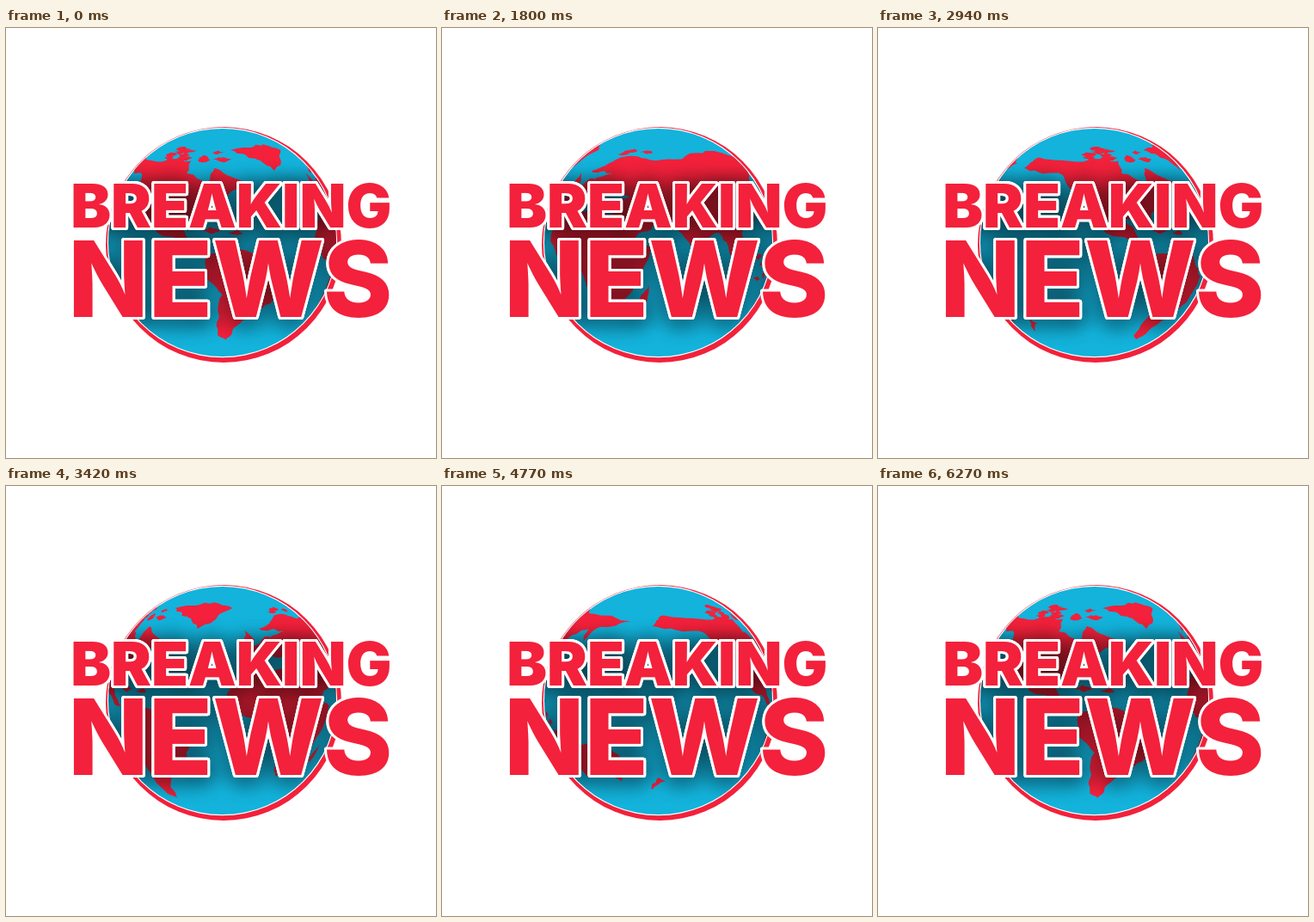
Recreate the animation shown at these times as an HTML page with a canvas. Size 500 by 500 pixels, loop 6300 ms.

```html
<!DOCTYPE html>
<html lang="en">
<head>
<meta charset="utf-8">
<title>Breaking News</title>
<style>
  html, body { margin: 0; width: 100%; height: 100%; overflow: hidden; background: #fff; }
  canvas { display: block; width: 500px; height: 500px; }
</style>
</head>
<body>
<canvas id="stage" width="500" height="500" role="img" aria-label="BREAKING NEWS"></canvas>
<script>
const LOOP = 6300, STEP = 30, TURNS = 2, START = -71, RAD = Math.PI / 180;
const RED = '#f3213b', SEA = '#13b3dc';
const GLOBE = { x: 251.5, y: 249.5, r: 132.5 };
const RIM = { x: 253, y: 252, r: 137 };

const ctx = document.getElementById('stage').getContext('2d');

let seed = 11;
const rand = () => (seed = (seed * 16807) % 2147483647) / 2147483647;
const between = (a, b) => a + (b - a) * rand();

// Adds jittered midpoints, for a ragged coast.
function roughen(pts) {
  return pts.flatMap((p, i) => {
    const q = pts[(i + 1) % pts.length];
    const amp = Math.min(0.15 * Math.hypot(q[0] - p[0], q[1] - p[1]), 1.6);
    return [p, [0, 1].map(k => (p[k] + q[k]) / 2 + between(-amp, amp))];
  });
}

// Turns longitude and latitude into a place on the sphere.
function coast(pts, scale = 1, shift = 0) {
  return roughen(roughen(roughen(pts))).map(([lon, lat]) => {
    const v = (lat * 0.85 - 12) * RAD;
    return { lon: lon * scale + shift, c: Math.cos(v), s: Math.sin(v) };
  });
}

const land = (text, scale, shift) =>
  coast(text.split(' ').map(p => p.split(',').map(Number)), scale, shift);

function isles(count, west, east, south, north, size) {
  return Array.from({ length: count }, () => {
    const lon = between(west, east), lat = between(south, north);
    return coast([0, 1, 2, 3].map(k => [
      lon + 1.8 * size * Math.cos(k * Math.PI / 2) * between(0.5, 1.2),
      lat + 0.7 * size * Math.sin(k * Math.PI / 2) * between(0.5, 1.2)
    ]));
  });
}

const ASIA = 0.94, OCEANIA = 25;
const lands = [
  // Americas
  land('-166,62 -158,71 -115,69 -94,68 -94,58 -79,52 -76,62 -57,52 -81,31 -81,25 -96,29 -90,19 -78,8 -106,20 -123,40 -132,57'),
  land('-72,78 -35,84 -18,78 -43,60 -54,70', 1, 8),
  land('-78,8 -62,10 -35,-6 -40,-22 -57,-37 -68,-55 -75,-50 -71,-18 -81,-4'),
  ...isles(14, -118, -58, 67, 80, 4),
  ...isles(4, -84, -64, 18, 22, 2),
  // Africa
  land('-17,15 -7,35 33,31 43,12 51,11 40,-15 20,-35 12,-16 9,4 -8,5'),
  land('49,-12 47,-25 43,-22'),
  // Europe and Asia
  land('-9,37 -9,43 8,54 25,58 18,60 6,60 26,71 60,69 104,77 190,66 163,60 157,51 155,60 136,54 122,39 121,28 108,20 104,2 92,20 77,8 66,25 56,25 44,13 34,30 27,37 41,42 15,40 3,43', ASIA),
  land('-6,50 1,52 -4,59'),
  land('131,32 141,37 143,44', ASIA),
  ...isles(4, -22, 58, 72, 78, 3),
  // Oceania
  ...isles(10, 96, 142, -8, 9, 3),
  land('131,-1 150,-10 138,-8', 1, OCEANIA),
  land('114,-22 131,-12 139,-17 142,-11 153,-26 146,-39 131,-32 116,-35', 1, OCEANIA),
  land('173,-36 178,-39 167,-46', 1, OCEANIA)
];

function disc(c, { x, y, r }, fill, grow = 0) {
  c.beginPath();
  c.arc(x, y, r + grow, 0, 2 * Math.PI);
  if (fill) {
    c.fillStyle = fill;
    c.fill();
  }
}

// Picks the size at which the line's ink spans the headline block.
function headline(c, text, weight, baseline) {
  const left = 78, span = 368;
  const font = size => `${weight} ${size}px Inter, "Liberation Sans", sans-serif`;
  c.font = font(100);
  const m = c.measureText(text);
  const size = 100 * span / (m.actualBoundingBoxLeft + m.actualBoundingBoxRight);
  return { text, font: font(size), x: left + m.actualBoundingBoxLeft * size / 100, y: baseline };
}

function makeTitle() {
  const canvas = document.createElement('canvas');
  canvas.width = canvas.height = 500;
  const c = canvas.getContext('2d');
  const lines = [headline(c, 'BREAKING', 900, 231.5), headline(c, 'NEWS', 800, 336)];
  const each = method => lines.forEach(l => {
    c.font = l.font;
    c[method](l.text, l.x, l.y);
  });
  c.lineJoin = 'round';
  c.lineWidth = 6;
  c.strokeStyle = '#fff';
  // The shadow falls on the globe only; two passes deepen it.
  c.save();
  disc(c, GLOBE);
  c.clip();
  c.shadowColor = 'rgba(0,0,0,.75)';
  c.shadowBlur = 24;
  c.shadowOffsetY = 3;
  each('strokeText');
  each('strokeText');
  c.restore();
  each('strokeText');
  c.fillStyle = RED;
  each('fillText');
  return canvas;
}

const title = makeTitle();

// Every point past the limb is held on it, so hidden parts fold away.
function drawLand(pts, centre) {
  for (const turn of [-360, 0, 360]) {
    const offs = pts.map(p => p.lon + turn - centre);
    if (offs.every(d => d > 90) || offs.every(d => d < -90)) continue;
    ctx.beginPath();
    pts.forEach((p, i) => {
      const d = Math.max(-90, Math.min(90, offs[i]));
      ctx.lineTo(GLOBE.r * p.c * Math.sin(d * RAD), -GLOBE.r * p.s);
    });
    ctx.fill();
  }
}

// Slow at both ends, steep in the middle.
function ease(t) {
  const a = t ** 1.7, b = (1 - t) ** 1.7;
  return a / (a + b);
}

function draw(ms) {
  const t = Math.floor((ms % LOOP) / STEP) * STEP / LOOP;
  const centre = (START + 360 * TURNS * ease(t) + 180) % 360 - 180;

  ctx.fillStyle = '#fff';
  ctx.fillRect(0, 0, 500, 500);
  disc(ctx, RIM, RED);
  disc(ctx, GLOBE, '#fff', 1.2);
  disc(ctx, GLOBE, SEA);

  ctx.save();
  ctx.translate(GLOBE.x, GLOBE.y);
  ctx.fillStyle = RED;
  lands.forEach(pts => drawLand(pts, centre));
  ctx.restore();

  ctx.drawImage(title, 0, 0);
}

const begin = performance.now();
function tick() {
  draw(performance.now() - begin);
  requestAnimationFrame(tick);
}
tick();
</script>
</body>
</html>
```
